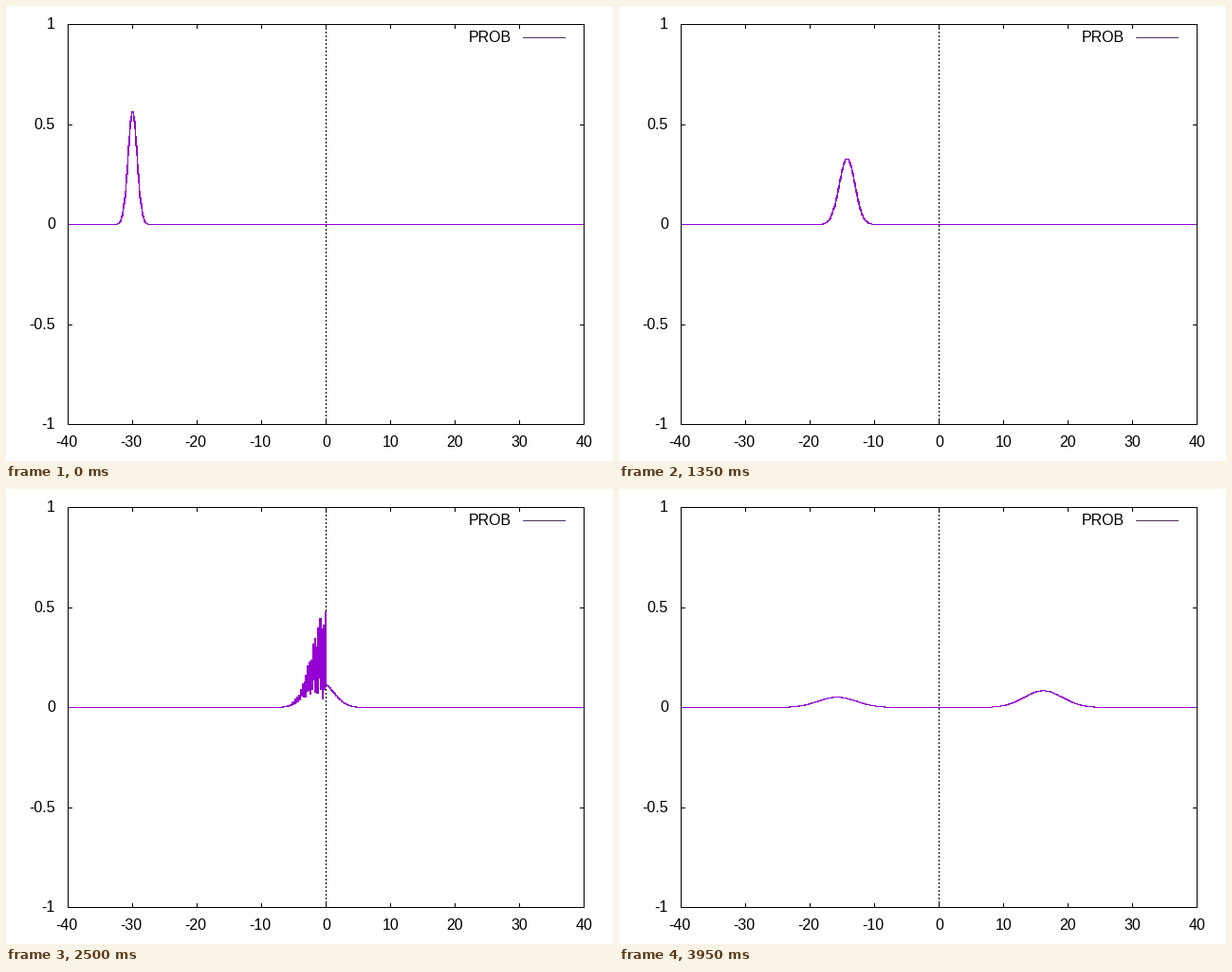
A matplotlib script that plays this animation: 640x480 px, repeating every 4 s.

```python
import numpy as np
import matplotlib.pyplot as plt
from matplotlib.animation import FuncAnimation

W, H, DPI = 640, 480, 100
FRAMES, INTERVAL = 80, 50
LEFT, RIGHT, TOP, BOTTOM = 65, 609, 19, 441
PX = 72 / DPI  # one pixel in points

plt.rcParams.update({
    "font.family": "Liberation Sans",
    "font.size": 16 * PX,
    "path.simplify": False,
})

# Gaussian packet scattering off a delta barrier at x = 0
K0, X0 = 11.32, -30.0
STRENGTH = 0.783 * K0
DT = 0.0515


def densities():
    """Return x and |psi|^2 for every time step."""
    x = np.linspace(-40, 40, 801)
    k = np.linspace(K0 - 5.5, K0 + 5.5, 441)
    t = DT * np.arange(FRAMES)
    phi = np.pi ** -0.25 * np.exp(-(k - K0) ** 2 / 2 - 1j * k * X0)
    phi = phi * (k[1] - k[0]) / np.sqrt(2 * np.pi)
    trans = 1 / (1 + 1j * STRENGTH / k)
    refl = trans - 1
    wave = np.exp(1j * np.outer(k, x))
    modes = np.where(x < 0,
                     wave + refl[:, None] * wave.conj(),
                     trans[:, None] * wave)
    psi = (phi * np.exp(-0.5j * np.outer(t, k ** 2))) @ modes
    return x, np.abs(psi) ** 2


def to_px(x):
    return np.floor(LEFT + (x + 40) / 80 * (RIGHT - LEFT) + 0.5)


def to_py(y):
    return np.floor(BOTTOM - (y + 1) / 2 * (BOTTOM - TOP) + 0.5)


fig = plt.figure(figsize=(W / DPI, H / DPI), dpi=DPI, facecolor="white")
ax = fig.add_axes([0, 0, 1, 1])
ax.set_xlim(0, W)
ax.set_ylim(H, 0)
ax.axis("off")


def stroke(xs, ys, color="black", **kw):
    """Draw a crisp one-pixel line through pixel centres."""
    line, = ax.plot(np.asarray(xs) + 0.5, np.asarray(ys) + 0.5, color=color,
                    lw=PX, antialiased=False, snap=False,
                    solid_capstyle="projecting", **kw)
    return line


def label(x, y, text, ha):
    ax.text(x, y, text, ha=ha, va="baseline", color="black")


for v in range(-40, 41, 10):
    px = to_px(v)
    stroke([px, px], [BOTTOM, BOTTOM - 4])
    stroke([px, px], [TOP, TOP + 4])
    label(px + (0.5 if v >= 0 else -1.5), 465, str(v), "center")

for v in (-1, -0.5, 0, 0.5, 1):
    py = to_py(v)
    stroke([LEFT, LEFT + 4], [py, py])
    stroke([RIGHT, RIGHT - 4], [py, py])
    label(52, py + 5, f"{v:g}", "right")

zero = to_px(0)
for y in range(TOP, BOTTOM, 4):
    stroke([zero, zero], [y, y + 1])

stroke([LEFT, RIGHT, RIGHT, LEFT, LEFT],
       [TOP, TOP, BOTTOM, BOTTOM, TOP], zorder=4)

label(533, 38, "PROB", "right")
stroke([545, 589], [33, 33], color="#4f3160")

grid, prob = densities()
curve = stroke(to_px(grid), to_py(prob[0]), color="#9400d3", zorder=3)


def update(i):
    curve.set_ydata(to_py(prob[i]) + 0.5)
    return curve,


anim = FuncAnimation(fig, update, frames=FRAMES, interval=INTERVAL,
                     repeat=True, repeat_delay=0)
plt.show()
```
